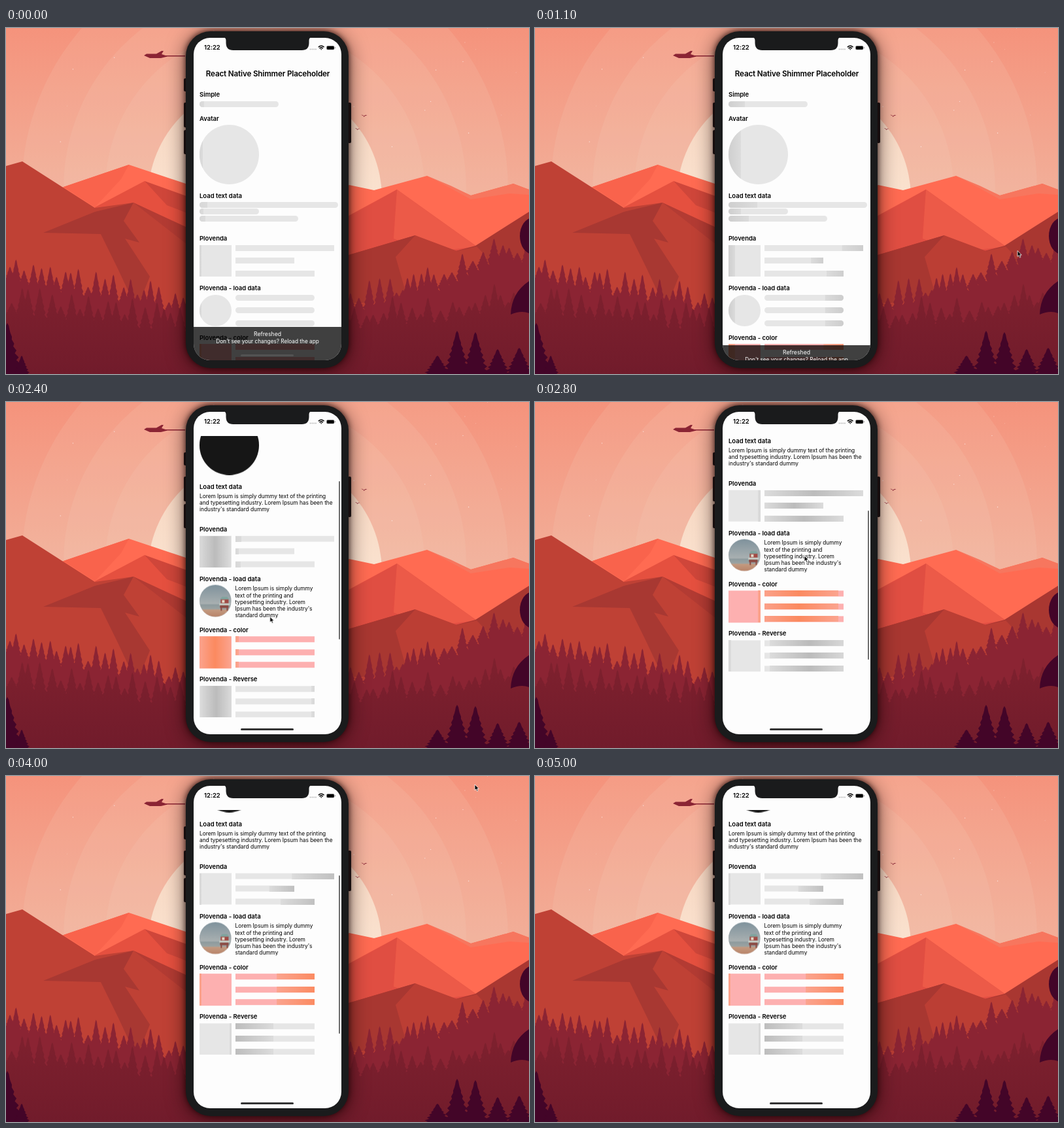
Write an HTML page that moves like this. It is 800 by 529 pixels and loops after 5100 ms.

```html
<!DOCTYPE html>
<html lang="en">
<head>
<meta charset="utf-8">
<title>Shimmer placeholder</title>
<style>
html, body { margin: 0; width: 100%; height: 100%; overflow: hidden; background: #7a1f2d; }
body { font-family: Inter, Roboto, sans-serif; color: #000; }
#stage { position: relative; width: 800px; height: 529px; overflow: hidden; }
#stage div, #stage svg { position: absolute; }
.wide { left: 0; top: 0; width: 800px; height: 529px; }

#phone { left: 275px; top: 5px; width: 249px; height: 514.5px; border-radius: 38px; background: #1a1b1c;
  box-shadow: 0 -1px 9px rgba(20, 0, 0, .75), 0 3px 30px rgba(20, 0, 0, .65); }
.key { width: 5px; border-radius: 2px; background: #1d1b1c; }
#screen { left: 286.5px; top: 15px; width: 226.5px; height: 492.5px; border-radius: 25px; background: #fdfdfd; overflow: hidden; }
#clip { left: 0; top: 37px; width: 227px; height: 456px; overflow: hidden; }
#list { left: -286.5px; top: -52px; width: 800px; height: 700px; animation: scroll 5.1s both; }
#tail { left: 0; top: 0; animation: shift 1ms var(--at) both; --at: 2.2s; }

.h { height: 14px; font: 600 9.5px/14px Inter, Roboto, sans-serif; letter-spacing: -.02px; white-space: nowrap; }
#title { left: 287px; width: 227px; top: 62px; height: 16px; text-align: center; font: 600 11.7px/16px Inter, Roboto, sans-serif; letter-spacing: -.17px; }
.p { font-size: 8.4px; line-height: 10.2px; letter-spacing: -.04px; white-space: pre; }

.s { --base: #e6e6e6; --edge: #dcdcdc; --peak: #bcbcbc; overflow: hidden; background: var(--base); }
.pink { --base: #fdb0b0; --edge: #fba48f; --peak: #fb8a60; }
.s::before { content: ""; position: absolute; inset: 0; transform: translateX(-100%);
  background: linear-gradient(90deg, var(--edge), var(--peak), var(--edge));
  animation: sweep 1s var(--wait) infinite; }
.back::before { animation-direction: reverse; }

.in { animation: show 1ms var(--at) both; }
.out { animation: show 1ms var(--at) both reverse; }

#thumb { left: 509.3px; width: 2.2px; border-radius: 1.1px; background: #707070; animation: thumb 5.1s both, flash 5.1s both; }
#home { left: 359px; top: 499.3px; width: 81px; height: 3px; border-radius: 2px; background: #333; --at: 1.22s; }
#toast { left: 286px; top: 456.5px; width: 228px; height: 52px; background: rgba(0, 0, 0, .75); color: #fff; text-align: center;
  white-space: nowrap; animation: drop .25s .97s ease-in-out both; }
#toast div { left: 0; width: 100%; line-height: 12px; }
#cursor { left: 0; top: 0; width: 8px; height: 12px; overflow: visible; animation: point 5.1s both; }

@keyframes sweep {
  0% { transform: translateX(-100%); animation-timing-function: ease-in; }
  50% { transform: none; animation-timing-function: ease-out; }
  100% { transform: translateX(100%); }
}
@keyframes show { from { opacity: 0; } to { opacity: 1; } }
@keyframes shift { to { transform: translateY(2.7px); } }
@keyframes drop { to { transform: translateY(52px); } }
@keyframes scroll {
  0%, 39.2% { transform: none; animation-timing-function: ease-in; }
  49% { transform: translateY(-183.5px); animation-timing-function: ease-out; }
  53%, 57% { transform: translateY(-197.3px); animation-timing-function: ease-in-out; }
  62.7% { transform: translateY(-189px); animation-timing-function: ease-out; }
  70.6%, 100% { transform: translateY(-183.5px); }
}
@keyframes thumb {
  0%, 39.2% { top: 52px; height: 242px; animation-timing-function: ease-in; }
  49% { top: 152px; height: 242px; animation-timing-function: ease-out; }
  53%, 57% { top: 166px; height: 228px; animation-timing-function: ease-in-out; }
  62.7% { top: 157.5px; height: 236.5px; animation-timing-function: ease-out; }
  70.6%, 100% { top: 152px; height: 242px; }
}
@keyframes flash {
  0%, 39.2% { opacity: 0; }
  40%, 79% { opacity: 1; }
  84%, 100% { opacity: 0; }
}
@keyframes point {
  0%, 17.6% { transform: translate(803px, 322px); animation-timing-function: ease-out; }
  21.57% { transform: translate(738px, 340.5px); animation-timing-function: ease-in-out; }
  37.25%, 39.2% { transform: translate(394px, 455.5px); animation-timing-function: ease-in; }
  49% { transform: translate(408px, 272px); animation-timing-function: ease-out; }
  53%, 57% { transform: translate(412px, 235px); animation-timing-function: ease-in-out; }
  62.75% { transform: translate(590px, 247px); animation-timing-function: ease-in-out; }
  78.43% { transform: translate(717px, 13px); }
  82%, 100% { transform: translate(730px, -16px); }
}
</style>
</head>
<body>
<div id="stage">
  <svg class="wide" viewBox="0 0 800 529">
    <defs>
      <linearGradient id="sky" x2="0" y2="1"><stop stop-color="#f5937c"/><stop offset=".85" stop-color="#f2ae98"/></linearGradient>
      <linearGradient id="sun" x2="0" y2=".5"><stop stop-color="#f6d3bd"/><stop offset="1" stop-color="#fae2cf"/></linearGradient>
      <linearGradient id="wood" x2="0" y2="1"><stop stop-color="#7f212e"/><stop offset="1" stop-color="#701b2b"/></linearGradient>
      <linearGradient id="sea" x2="0" y2="1"><stop stop-color="#7f929c"/><stop offset=".6" stop-color="#a9b0b1"/><stop offset=".62" stop-color="#8d9a9d"/><stop offset=".76" stop-color="#9ba3a2"/><stop offset=".79" stop-color="#c39a80"/><stop offset="1" stop-color="#b98469"/></linearGradient>
    </defs>
    <rect width="800" height="290" fill="url(#sky)"/>
    <g fill="#f0d0bc" fill-opacity=".15">
      <circle cx="396" cy="245" r="372"/><circle cx="396" cy="245" r="308"/><circle cx="396" cy="245" r="244"/>
    </g>
    <circle cx="396" cy="260" r="179" fill="url(#sun)"/>
    <g id="stars" fill="#fff" fill-opacity=".6"></g>
    <path d="M211 42l4-2.500h15l8-4.500h3l-3 5 6 2h30v1.500h-27l-10 2.500h-17z" fill="#8b2434"/>
    <path d="M543 133q3-1 4.500 2 1.500-3 5-1.500-3.500 0-5 2.500-1.500-3-4.500-3zM534 153q2-.5 3.500 2 1.500-2 4-1-3 0-4 2-1-2-3.500-3z" fill="#8b2434"/>
    <path d="M60 255L88 243 188 209 290 243 480 260 525 240 563 248 644 226 711 256 776 238 800 247V420H0z" fill="#ff6b52"/>
    <path d="M644 226l36 15 31 15 65-18 24 9v8l-30-2-59 9-40-22z" fill="#f7765e"/>
    <path d="M88 243L188 209l-12 22-40 43z" fill="#f9634c"/>
    <path d="M136 274L212 234 290 285V330H150z" fill="#e5503f"/>
    <path d="M212 234l34 37 44 17V262z" fill="#cf463a"/>
    <path d="M500 300L598 247 720 334 690 360H500z" fill="#e24e42"/>
    <path d="M598 247L720 334l-65 8-62-20z" fill="#ec5a48"/>
    <path d="M598 247l-8 80-90 33v-55z" fill="#e04e42"/>
    <path d="M0 211L25 204 136 275 195 267 290 312V470H0z" fill="#bf4135"/>
    <path d="M57 313L136 281 195 267 180 295 204 328 182 322 220 380 200 430 172 370 145 315z" fill="#a83832"/>
    <path d="M195 267l95 44v30z" fill="#b33b33"/>
    <path d="M800 281L718 333 680 343 640 440H800z" fill="#a93731"/>
    <path d="M500 354L626 317 690 341 720 334 735 350 700 450H500z" fill="#bb3e34"/>
    <path d="M500 354L626 317l-30 33 20 70H500z" fill="#a83731"/>
    <g id="woods"></g>
    <g fill="#430528">
      <ellipse cx="806" cy="318" rx="20" ry="28"/>
      <path d="M800 387Q773 405 772 438 788 431 800 436z"/>
    </g>
  </svg>

  <div class="key" style="left:272px;top:77px;height:20px"></div>
  <div class="key" style="left:272px;top:114px;height:38px"></div>
  <div class="key" style="left:272px;top:156px;height:37px"></div>
  <div class="key" style="left:522.500px;top:114px;height:62px"></div>
  <div id="phone"></div>
  <div id="screen">
    <div id="clip"><div id="list">
      <div id="title">React Native Shimmer Placeholder</div>
      <div id="tail"></div>
    </div></div>
    <div class="wide" style="left:-286.500px;top:-15px">
      <div id="thumb"></div>
      <div id="home" class="in"></div>
      <div id="toast">
        <div style="top:5.500px;font-size:8.700px">Refreshed</div>
        <div style="top:16px;font-size:8.250px">Don't see your changes? Reload the app</div>
        <div style="left:73px;top:42.500px;width:81px;height:3px;border-radius:2px;background:rgba(255,255,255,.1)"></div>
      </div>
      <div class="h" style="left:303px;top:23.300px">12:22</div>
      <svg class="wide" viewBox="0 0 800 529">
        <path d="M331 14q5.500 0 5.500 5v3.500q0 11.500 11 11.500h105q11 0 11-11.500v-3.500q0-5 5.500-5z" fill="#1a1b1c"/>
        <g fill="#b5b5b5"><circle cx="465.500" cy="32.500" r=".9"/><circle cx="468.300" cy="32.500" r=".9"/><circle cx="471.100" cy="32.500" r=".9"/><circle cx="473.900" cy="32.500" r=".9"/></g>
        <g fill="none" stroke="#000" stroke-width="1.500"><path d="M477.800 29.300q4.400-4 8.800 0M479.500 31.300q2.700-2.400 5.400 0"/></g>
        <path d="M480.800 32.300h2.800l-1.400 1.500z"/>
        <rect x="490.500" y="27.500" width="11.500" height="5.600" rx="1.600" fill="#000" stroke="#888" stroke-width=".7"/>
        <path d="M503.200 29v2.600q1-.3 1-1.300t-1-1.300z" fill="#888"/>
      </svg>
    </div>
  </div>
  <svg id="cursor" viewBox="0 0 8 12"><path d="M0 0V8.800L2 7 3.500 10.300 5 9.600 3.600 6.500H6.300z" stroke="#fff" stroke-width=".8"/></svg>
</div>
<script>
const $ = id => document.getElementById(id);
const LOOP = 5100, STEP = 100;
const list = $('list'), tail = $('tail');

// scenery
let seed = 7;
const rnd = () => (seed = seed * 16807 % 2147483647) / 2147483647;

// jagged outline of one fir, left foot to right foot
function fir(x, y, w, h, tiers = 5) {
  const left = [];
  for (let k = 0; k < tiers; k++) {
    const r = w * (1 - k / tiers);
    left.push([r, h * k / tiers], [r * .65, h * (k + .6) / tiers]);
  }
  const right = left.slice().reverse().map(([r, u]) => [-r, u]);
  return [...left, [0, h], ...right].map(([r, u]) => `L${(x - r).toFixed(1)} ${(y - u).toFixed(1)}`).join('');
}
function level(pts, x) {
  const i = Math.max(1, pts.findIndex(p => p[0] >= x));
  const [a, b] = [pts[i - 1], pts[i]];
  return a[1] + (b[1] - a[1]) * (x - a[0]) / (b[0] - a[0]);
}
function ridge(pts, gap, height, fill) {
  let d = 'M-20 540';
  for (let x = -10; x < 812; x += gap * (.6 + rnd() * .8))
    d += fir(x, level(pts, x), gap * .8, height * (.4 + rnd() * .9));
  return `<path d="${d}L820 540z" fill="${fill}"/>`;
}
const bush = ([x, w, h]) => `<path d="M${x} 535${fir(x, 535, w, h, 8)}z" fill="#430528"/>`;

$('woods').innerHTML =
  ridge([[-20, 380], [50, 402], [180, 422], [275, 440], [525, 434], [640, 410], [700, 378], [750, 352], [820, 368]], 12, 35, '#8b2433') +
  ridge([[-20, 436], [120, 452], [275, 468], [525, 462], [680, 450], [820, 424]], 14, 36, 'url(#wood)') +
  [[2, 28, 84], [24, 16, 34], [660, 26, 34], [690, 24, 72], [718, 24, 70], [752, 24, 44], [785, 26, 46]].map(bush).join('');

for (let i = 0; i < 26; i++)
  $('stars').innerHTML += `<circle cx="${rnd() * 800}" cy="${rnd() * 190}" r="${.4 + rnd() * .4}"/>`;

// app content
function add(parent, cls, x, y, css = '', html = '') {
  const el = document.createElement('div');
  el.className = cls;
  el.style.cssText = `left:${x}px;top:${y}px;${css}`;
  el.innerHTML = html;
  parent.append(el);
}
const head = (parent, y, text) => add(parent, 'h', 296, y - 6.8, '', text);
const shim = (parent, x, y, w, h, wait, { r = 0, cls = '', at = 0 } = {}) =>
  add(parent, `s ${cls}${at ? ' out' : ''}`, x, y, `width:${w}px;height:${h}px;border-radius:${r}px;--wait:${wait}ms;--at:${at}ms`);
const text = (x, y, lines) => add(list, 'p in', x, y, '--at:2200ms', lines.join('\n'));

function card(parent, y, name, widths, wait, opt = {}) {
  head(parent, y, name);
  shim(parent, 296, y + 9.5, 48.5, 48.5, -95, { cls: opt.cls, r: opt.r ? 25 : 0 });
  widths.forEach((w, i) => shim(parent, 350.5, y + 9.5 + i * 19.6, w, 9, wait, opt));
}

head(list, 102, 'Simple');
shim(list, 296, 111.5, 121, 9, -95, { r: 4.5 });
head(list, 138.5, 'Avatar');
shim(list, 296, 148, 91, 91, -95, { r: 46 });
add(list, 'in', 296, 148, 'width:91px;height:91px;border-radius:50%;background:#161616;--at:2200ms');
head(list, 256.5, 'Load text data');
[211.5, 90.5, 151].forEach((w, i) => shim(list, 296, 266 + i * 10.3, w, 9, -95, { r: 4.5, at: 2200 }));
text(296, 265.6, ['Lorem Ipsum is simply dummy text of the printing',
  'and typesetting industry. Lorem Ipsum has been the', "industry's standard dummy"]);

const brand = 'Plovenda';
card(list, 322.2, brand, [151, 90.5, 121], 300);
card(list, 398, brand + ' - load data', [121, 121, 121], 310, { r: 4.5, at: 2200 });
add(list, 'in', 296, 407.4, '--at:1500ms', `<svg width="48.500" height="48.500" viewBox="0 0 48 48">
  <circle cx="24" cy="24" r="24" fill="url(#sea)"/>
  <path d="M31 22l3-4h8l3 4z" fill="#7fa39d"/><path d="M32 22h12v6H32z" fill="#a04a44"/>
  <path d="M34 23h4v4h-4z" fill="#e4dccb"/><path d="M30 28h16v3H30z" fill="#c9d0c8"/>
  <path d="M31 31h13v4H31zM32 35h2v4h-2zM41 35h2v4h-2z" fill="#8c4a43"/></svg>`);
text(350.5, 407.4, ['Lorem Ipsum is simply dummy', 'text of the printing and', 'typesetting industry. Lorem',
  'Ipsum has been the industry\'s', 'standard dummy']);
card(tail, 473.6, brand + ' - color', [121, 121, 121], 320, { cls: 'pink' });
card(tail, 549.2, brand + ' - Reverse', [121, 121, 121], 320, { cls: 'back' });

// one clock drives every keyframe animation
const anims = document.getAnimations();
anims.forEach(a => a.pause());
function tick() {
  const t = performance.now() % LOOP;
  const now = Math.floor(t / STEP) * STEP;
  anims.forEach(a => { a.currentTime = now; });
  requestAnimationFrame(tick);
}
tick();
</script>
</body>
</html>
```
